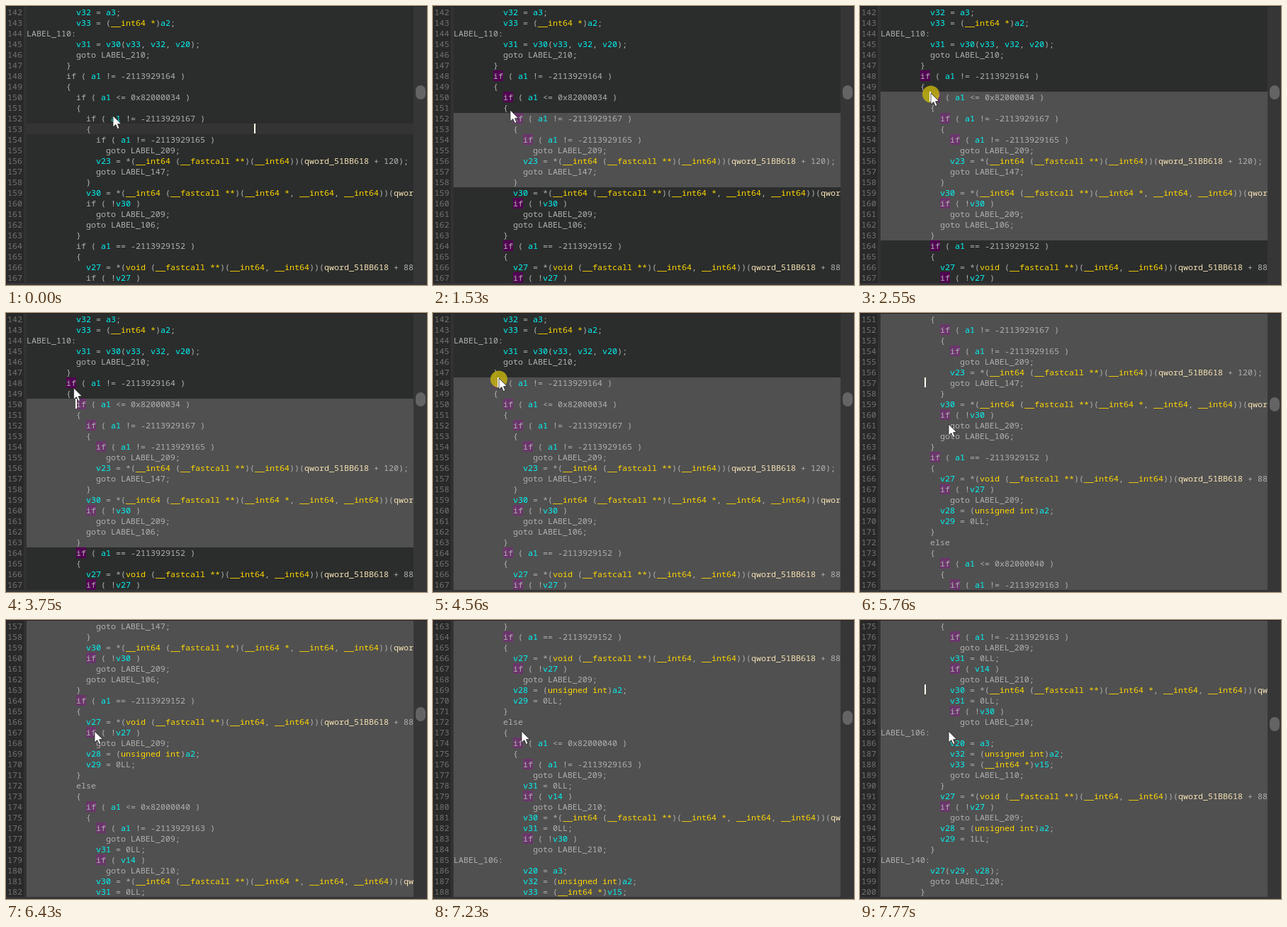
These frames come from a looping animation (594x394 px, 8 s). An HTML page with a canvas:

```html
<!DOCTYPE html>
<html lang="en">
<head>
<meta charset="utf-8">
<title>Selecting code blocks</title>
<style>
  html, body { margin: 0; width: 100%; height: 100%; overflow: hidden; background: #2b2d2c; }
  canvas { display: block; }
</style>
</head>
<body>
<canvas id="stage" width="594" height="394"></canvas>
<script>
const LOOP = 8000, FIRST = 142, ROW = 15, COL = 7, LEFT = 29, RIGHT = 575, BOTTOM = 391;

const code = `          v32 = a3;
          v33 = (__int64 *)a2;
LABEL_110:
          v31 = v30(v33, v32, v20);
          goto LABEL_210;
        }
        if ( a1 != -2113929164 )
        {
          if ( a1 <= 0x82000034 )
          {
            if ( a1 != -2113929167 )
            {
              if ( a1 != -2113929165 )
                goto LABEL_209;
              v23 = *(__int64 (__fastcall **)(__int64))(qword_51BB618 + 120);
              goto LABEL_147;
            }
            v30 = *(__int64 (__fastcall **)(__int64 *, __int64, __int64))(qword_51BB618 + 96);
            if ( !v30 )
              goto LABEL_209;
            goto LABEL_106;
          }
          if ( a1 == -2113929152 )
          {
            v27 = *(void (__fastcall **)(__int64, __int64))(qword_51BB618 + 88);
            if ( !v27 )
              goto LABEL_209;
            v28 = (unsigned int)a2;
            v29 = 0LL;
          }
          else
          {
            if ( a1 <= 0x82000040 )
            {
              if ( a1 != -2113929163 )
                goto LABEL_209;
              v31 = 0LL;
              if ( v14 )
                goto LABEL_210;
              v30 = *(__int64 (__fastcall **)(__int64 *, __int64, __int64))(qword_51BB618 + 96);
              v31 = 0LL;
              if ( !v30 )
                goto LABEL_210;
LABEL_106:
              v20 = a3;
              v32 = (unsigned int)a2;
              v33 = (__int64 *)v15;
              goto LABEL_110;
            }
            v27 = *(void (__fastcall **)(__int64, __int64))(qword_51BB618 + 88);
            if ( !v27 )
              goto LABEL_209;
            v28 = (unsigned int)a2;
            v29 = 1LL;
          }
LABEL_140:
          v27(v29, v28);
          goto LABEL_120;
        }`;

const token = /(\b[va]\d+\b|__int64|__fastcall|void|unsigned int|\*+(?=[),])|qword_\w+|\bif\b)/;
const lines = code.split("\n").map(line => {
  let col = 0;
  return line.split(token).map(text => {
    const part = { text, col };
    col += text.length;
    return part;
  });
});

function colorOf(text) {
  if (/^[va]\d+$/.test(text)) return "#00f5f5";
  if (/^qword/.test(text)) return "#f7e3b5";
  if (/^(__|void|unsigned|\*+$)/.test(text)) return "#ffd700";
  return "#b0b0b0";
}

// Each click selects a block (line numbers) and places the caret.
const clicks = [
  { at: 550, from: 152, to: 158, caret: [112, 151], blink: 570 },
  { at: 2550, from: 150, to: 163, caret: [98, 121], blink: 2520 },
  { at: 4490, from: 148, to: 999, caret: [91, 91], blink: 4530 }
];
const idle = { at: -999, from: 0, to: -1, caret: [350, 166], blink: 0 };

// Wheel steps, three lines each.
const wheel = [5560, 5630, 5700, 5830, 6430, 6500, 7230, 7300, 7500, 7570, 7770];

// Pointer path: time, x, y.
const path = [
  [0, 151, 155], [70, 151, 155], [480, 114, 155], [870, 114, 155], [1070, 113, 150],
  [1460, 113, 150], [1530, 109, 147], [1950, 98, 125], [2080, 98, 125], [2150, 100, 123],
  [2880, 100, 123], [3020, 99, 124], [3350, 99, 124], [4090, 93, 92],
  [4620, 93, 92], [5290, 125, 157], [LOOP, 125, 157]
];

const g = document.getElementById("stage").getContext("2d");

function rect(color, x, y, w, h) {
  g.fillStyle = color;
  g.fillRect(x, y, w, h);
}

function pointerAt(t) {
  const i = path.findIndex(p => p[0] > t);
  const [t0, x0, y0] = path[i - 1], [t1, x1, y1] = path[i];
  const k = (t - t0) / (t1 - t0), e = k * k * (3 - 2 * k);
  return [x0 + (x1 - x0) * e, y0 + (y1 - y0) * e];
}

function drawCode(scroll, click) {
  g.save();
  g.beginPath();
  g.rect(0, 0, RIGHT, BOTTOM);
  g.clip();
  g.font = '11.667px "Noto Sans Mono", "DejaVu Sans Mono", monospace';
  for (let r = 0; r < 26; r++) {
    const number = FIRST + scroll + r, top = 1 + r * ROW, base = top + 12;
    const selected = number >= click.from && number <= click.to;
    if (selected) rect("#505050", LEFT, top, RIGHT - LEFT, ROW);
    else if (click === idle && number === 153) rect("#343434", LEFT, top, RIGHT - LEFT, ROW);
    g.fillStyle = "#737373";
    g.fillText(number, 2, base);
    for (const { text, col } of lines[number - FIRST]) {
      const x = LEFT + col * COL;
      if (text === "if" && click !== idle) rect(selected ? "#6a356a" : "#520052", x, top, 2 * COL, ROW);
      g.fillStyle = colorOf(text);
      g.fillText(text, x, base);
    }
  }
  g.restore();
}

function drawPointer(x, y) {
  g.save();
  g.translate(x, y);
  g.beginPath();
  [[0, 0], [0, 16], [3.8, 12.6], [6.4, 18.5], [9, 17.4], [6.5, 11.7], [11.5, 11.5]]
    .forEach(p => g.lineTo(...p));
  g.closePath();
  g.fillStyle = "#fff";
  g.fill();
  g.strokeStyle = "#222";
  g.lineWidth = 0.8;
  g.stroke();
  g.restore();
}

function draw(t) {
  const click = clicks.filter(c => c.at <= t).pop() || idle;
  const scroll = 3 * wheel.filter(w => w <= t).length;
  const [x, y] = pointerAt(t);

  rect("#2b2d2c", 0, 0, 594, 394);
  rect("#292929", 0, 0, 25, 394);
  rect("#323232", 25, 0, 4, 394);
  drawCode(scroll, click);

  rect("#363636", RIGHT, 0, 19, 394);
  rect("#363636", 0, BOTTOM, 594, 3);
  rect("#222", 0, 0, 594, 1);
  g.fillStyle = "#646464";
  g.beginPath();
  g.roundRect(578, 112 + Math.round(scroll * 0.757), 14, 20, 7);
  g.fill();

  if (t - click.at < 130) {
    g.fillStyle = "rgba(190,175,15,.85)";
    g.beginPath();
    g.arc(x, y + 1.5, 12, 0, 7);
    g.fill();
  }
  const blink = Math.floor(Math.max(0, t - click.blink) / 500);
  if (blink % 2 === 0) rect("#fffff0", ...click.caret, 2, 14);
  drawPointer(x, y);
}

function frame() {
  draw(performance.now() % LOOP);
  requestAnimationFrame(frame);
}
frame();
</script>
</body>
</html>
```
